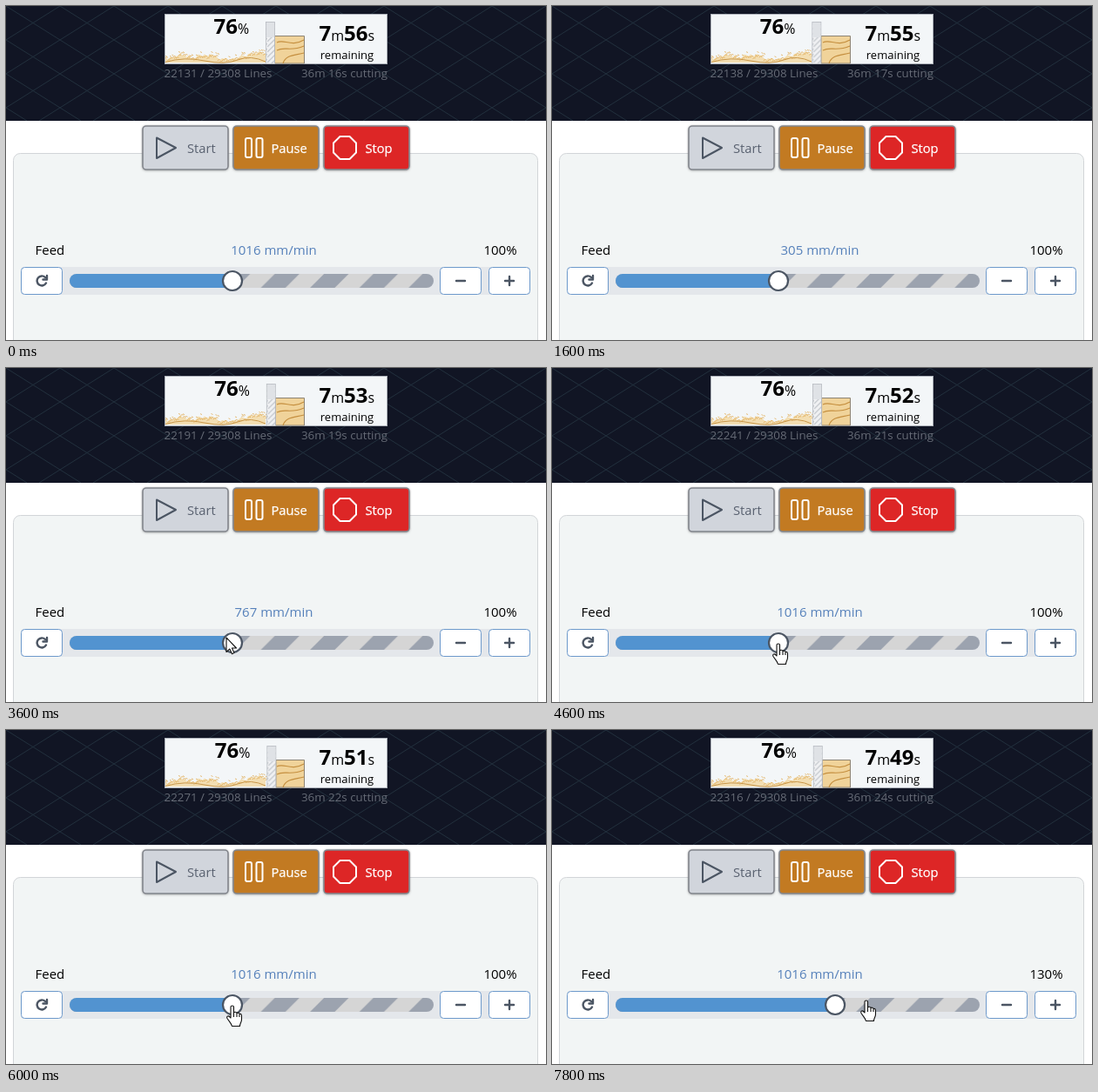
An HTML page that plays this animation: 620 by 384 pixels, repeating every 8 s.

```html
<!DOCTYPE html>
<html lang="en">
<head>
<meta charset="utf-8">
<title>Cutting progress</title>
<style>
  html, body { margin: 0; width: 100%; height: 100%; overflow: hidden; background: #fff; }
  svg { display: block; width: 620px; height: 384px; font: 15px "Open Sans", "Noto Sans", sans-serif; }
  .label { font-size: 14.7px; }
  .small { font-size: 13.35px; fill: #666b76; }
  .unit { font-size: 16px; font-weight: 400; }
  .big { font-size: 24px; font-weight: 700; }
  .mid { text-anchor: middle; }
  .end { text-anchor: end; }
  .line { fill: none; stroke-linecap: round; stroke-linejoin: round; stroke-width: 2; }
  .step { fill: #fff; stroke: #6d99cb; }
  .frame { stroke: #83868d; stroke-width: 1.6; }
  .pointer { fill: #fff; stroke: #111; stroke-width: 1.1; stroke-linejoin: round; }
</style>
</head>
<body>
<svg viewBox="0 0 620 384">
  <defs>
    <pattern id="stripes" patternUnits="userSpaceOnUse" x="236" y="308" width="56.57" height="16">
      <rect width="57" height="16" fill="#d5d5d5"/>
      <path d="M0 16H28.3L44.3 0H16Z" fill="#9ca3af"/>
    </pattern>
    <pattern id="flutes" patternUnits="userSpaceOnUse" width="10" height="12">
      <rect width="10" height="12" fill="#f0f1f3"/>
      <path d="M0 11L10 1M0 5L6 -1M4 13L10 7" stroke="#c6cacf" stroke-width="1.3"/>
    </pattern>
    <clipPath id="sky"><rect width="620" height="132"/></clipPath>
    <clipPath id="track"><rect x="73" y="308" width="418" height="16" rx="8"/></clipPath>
    <filter id="soft" x="-10%" y="-10%" width="120%" height="125%">
      <feDropShadow dx="0" dy=".5" stdDeviation=".8" flood-color="#444" flood-opacity=".5"/>
    </filter>
  </defs>

  <rect width="620" height="132" fill="#111524"/>
  <g id="grid" clip-path="url(#sky)" fill="none"/>

  <rect x="182.5" y="9.5" width="255" height="57" fill="#f3f6f8" stroke="#aeb3bb"/>
  <g id="chips"></g>
  <path id="wood" fill="#f0d39a" stroke="#8d8373"/>
  <path d="M311 42C319 37 327 48 342 39M311 51C320 46 326 53 342 46M318 66C321 56 331 57 342 54"
        fill="none" stroke="#c58f3f" stroke-width="1.2"/>
  <g id="bit">
    <rect x="298.5" y="18.5" width="10" height="48" fill="url(#flutes)" stroke="#b6bac0" stroke-width=".8"/>
    <rect x="299" y="19" width="9" height="17" fill="#dfe2e6"/>
    <text x="238.5" y="32" class="big">76<tspan class="unit">%</tspan></text>
  </g>
  <text x="359.5" y="40" class="big">7<tspan class="unit">m</tspan><tspan id="left"></tspan><tspan class="unit">s</tspan></text>
  <text x="391.5" y="61" class="mid" font-size="13">remaining</text>
  <text id="lines" x="181.5" y="82" class="small"></text>
  <text id="cut" x="438" y="82" class="small end"></text>

  <rect x="8.5" y="169.5" width="602" height="230" rx="8" fill="#f2f5f5" stroke="#d2d5d8"/>

  <g filter="url(#soft)">
    <rect class="frame" x="157" y="138" width="98" height="50" rx="4" fill="#d1d5dc"/>
    <rect class="frame" x="261" y="138" width="98" height="50" rx="4" fill="#c27a23"/>
    <rect class="frame" x="365" y="138" width="98" height="50" rx="4" fill="#dd2626"/>
  </g>
  <path class="line" d="M173 151.5V175L195 163Z" stroke="#4b5563"/>
  <g class="line" stroke="#fff">
    <rect x="275" y="152" width="7" height="22" rx="2"/>
    <rect x="287.5" y="152" width="7" height="22" rx="2"/>
    <path d="M383.5 150H394.5L402 157.5V168.5L394.5 176H383.5L376 168.5V157.5Z"/>
  </g>
  <text x="208" y="169" class="label" fill="#596170">Start</text>
  <g class="label" fill="#fff" stroke="#fff" stroke-width=".25">
    <text x="304.5" y="169">Pause</text>
    <text x="412.5" y="169">Stop</text>
  </g>

  <text x="33.5" y="286">Feed</text>
  <text id="feed" x="307.5" y="286" class="mid" fill="#5580ba"></text>
  <text id="percent" x="586.5" y="286" class="end"></text>

  <rect x="17" y="300" width="585" height="32" rx="4" fill="#e4e7eb"/>
  <g clip-path="url(#track)">
    <rect x="73" y="308" width="418" height="16" fill="url(#stripes)"/>
    <rect id="fill" x="73" y="308" height="16" fill="#5293d0"/>
  </g>
  <circle id="thumb" cy="316" r="11" fill="#fff" stroke="#4b5563" stroke-width="2.2"/>
  <rect class="step" x="17.5" y="300.5" width="47" height="31" rx="4"/>
  <rect class="step" x="498.5" y="300.5" width="47" height="31" rx="4"/>
  <rect class="step" x="554.5" y="300.5" width="47" height="31" rx="4"/>
  <path class="line" d="M45 312A5.5 5.5 0 1 0 46 318.5M47 310V314.5H42.5M517 316H527M573 316H583M578 311V321"
        stroke="#4b5563" style="stroke-width:2.4"/>

  <path id="arrow" class="pointer" d="M0 0V16.5L3.9 13L6.5 18.7L9 17.6L6.5 12H11.5Z"/>
  <path id="hand" class="pointer"
        d="M-2 14V1.500C-2 -.5 1.500 -.5 1.500 1.500V8C2 6.700 5 7 5 8.800C5.500 7.700 8 8 8 9.600C9 9 10.500 9.500 10.500 11.500V16C10.500 19 8.500 20 8.500 23.500H-.5C-1 20.500 -4 18 -6 14.500C-7 12.500 -5 11 -3.500 12.500ZM1.500 8V13M5 9V13M8 10V13"/>
</svg>
<script>
const LOOP = 8000, TICK = 200;
const el = id => document.getElementById(id);
const svgNS = "http://www.w3.org/2000/svg";

function add(parent, d, attrs) {
  const path = document.createElementNS(svgNS, "path");
  path.setAttribute("d", d);
  for (const key in attrs) path.setAttribute(key, attrs[key]);
  parent.append(path);
}

let grid = "";
for (let x = -248; x < 880; x += 62) grid += `M${x} 0l210 132M${x} 0l-210 132`;
add(el("grid"), grid, { stroke: "#22303d", "stroke-width": 1 });

let seed = 11;
const random = () => (seed = seed * 16807 % 2147483647) / 2147483647;

// Shavings: a pale heap on a brown edge, with loose curls on top.
function drawChips() {
  const bump = (x, centre, width) => Math.exp(-(((x - centre) / width) ** 2));
  const height = x => 6 + Math.sin(x / 6) + 3 * bump(x, 205, 14) + 4 * bump(x, 228, 10) + 8 * bump(x, 292, 14);
  let heap = "M183 65", curls = "", dots = "";
  for (let x = 183; x <= 298; x += 2.5) {
    const top = 64 - height(x) + random() * 4;
    heap += `L${x} ${top.toFixed(1)}`;
    curls += `M${x} ${(top + random() * 4).toFixed(1)}q1 -3 3 -1`;
    if (random() < 0.4) dots += `M${x} ${(top - 1 - random() * 4).toFixed(1)}l2 1`;
  }
  add(el("chips"), heap + "L298 65Z", { fill: "#f3deb2" });
  add(el("chips"), curls + dots, { fill: "none", stroke: "#e2b467", "stroke-width": 0.9 });
  add(el("chips"), "M183 64.5Q205 58 228 63T266 62T298 64", { fill: "none", stroke: "#c9974a", "stroke-width": 1 });
}
drawChips();

// Tracks are [time, value] pairs.
const leftTrack = [[0, 56], [1000, 55], [2400, 54], [3200, 53], [4200, 52], [5400, 51], [6400, 50], [7400, 49]];
const cutTrack = [[0, 16], [1000, 17], [2000, 18], [3000, 19], [3800, 20], [4400, 21], [5400, 22], [7000, 23], [7600, 24]];
const feedTrack = [[0, 1016], [1000, 305], [2200, 1016], [3400, 767], [3800, 1016]];
const percentTrack = [[0, 100], [7000, 110], [7400, 120], [7600, 130]];
const lineTrack = [[0, 22131], [1600, 22138], [3600, 22191], [4600, 22241], [6000, 22271], [6800, 22288], [7800, 22316]];
const handX = [[3800, 260], [6400, 260], [6800, 292.5], [7800, 361]];
const handY = [[3800, 317], [6400, 317], [6800, 315], [7800, 311]];

const hold = (track, t) => track.filter(([time]) => time <= t).pop()[1];

function glide(track, t) {
  const next = track.findIndex(([time]) => time > t);
  if (next < 0) return track[track.length - 1][1];
  if (next === 0) return track[0][1];
  const [t0, v0] = track[next - 1], [t1, v1] = track[next];
  return v0 + (v1 - v0) * (t - t0) / (t1 - t0);
}

function place(id, shown, x, y) {
  el(id).setAttribute("visibility", shown ? "visible" : "hidden");
  el(id).setAttribute("transform", `translate(${x} ${y})`);
}

function draw(t) {
  const percent = hold(percentTrack, t);
  const thumbX = 260 + (percent - 100) * 2.17;
  const shift = 1.8 * t / LOOP;

  el("left").textContent = hold(leftTrack, t);
  el("lines").textContent = `${Math.round(glide(lineTrack, t))} / 29308 Lines`;
  el("cut").textContent = `36m ${hold(cutTrack, t)}s cutting`;
  el("feed").textContent = `${hold(feedTrack, t)} mm/min`;
  el("percent").textContent = `${percent}%`;
  el("thumb").setAttribute("cx", thumbX);
  el("fill").setAttribute("width", thumbX - 73);
  el("bit").setAttribute("transform", `translate(${shift} 0)`);
  el("wood").setAttribute("d", `M${308.5 + shift} 34.5H342.5V66H${308.5 + shift}Z`);

  const arriving = t < 3600;
  place("arrow", t >= 3400 && t < 3800, arriving ? 570 : 253, arriving ? 200 : 310);
  place("hand", t >= 3800, glide(handX, t), glide(handY, t));
}

const start = performance.now();
function frame() {
  const t = (performance.now() - start) % LOOP;
  draw(Math.floor(t / TICK) * TICK);
  requestAnimationFrame(frame);
}
draw(0);
requestAnimationFrame(frame);
</script>
</body>
</html>
```
